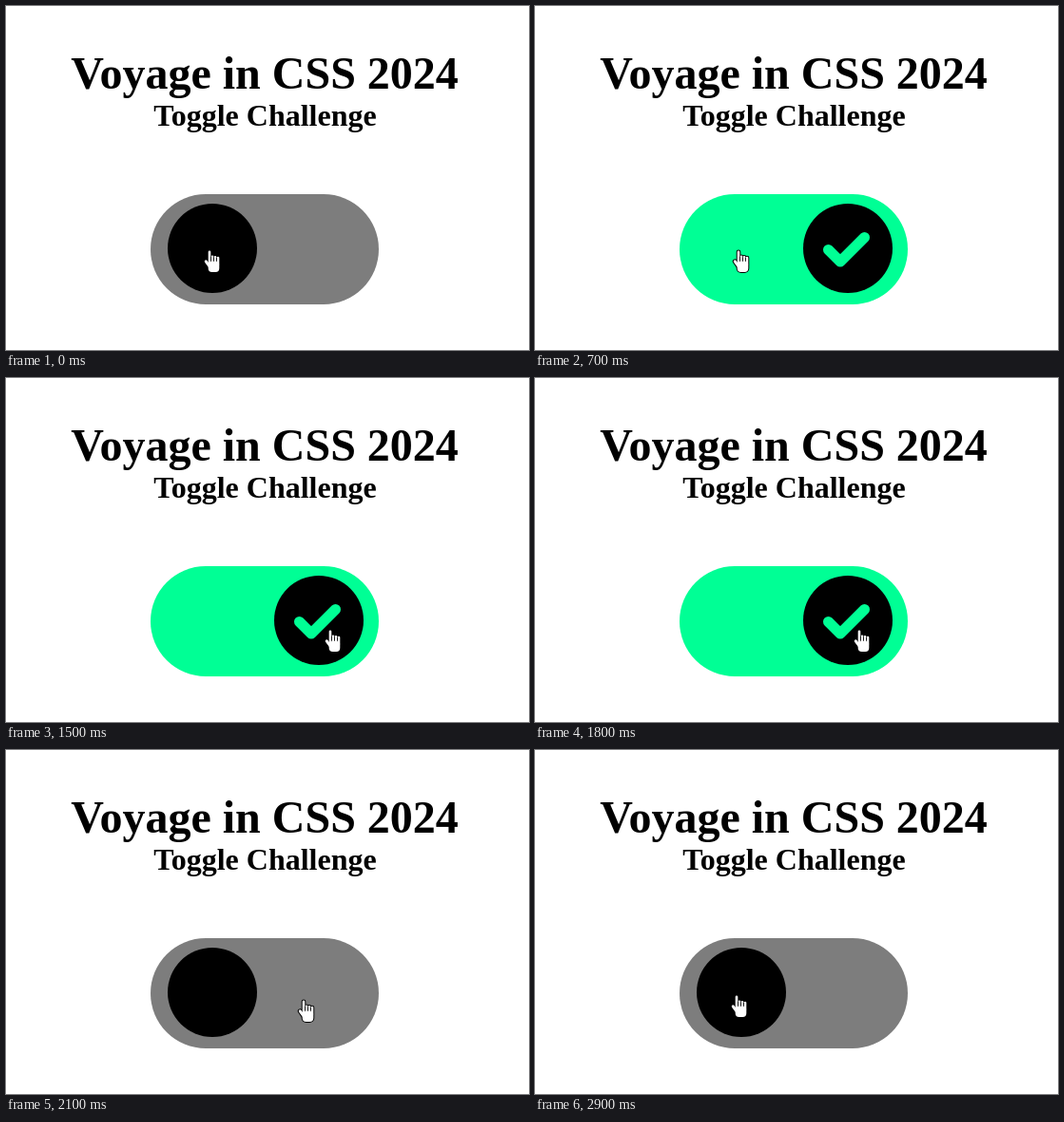
An HTML page with a canvas that plays this animation: 550 by 362 pixels, repeating every 3000 ms.

```html
<!DOCTYPE html>
<html lang="en">
<head>
<meta charset="utf-8">
<title>Toggle Challenge</title>
<style>
  html, body { margin: 0; width: 100%; height: 100%; overflow: hidden; background: #fff; }
  canvas { display: block; }
</style>
</head>
<body>
<canvas id="stage" width="550" height="362"></canvas>
<script>
const ctx = document.getElementById('stage').getContext('2d');
const LOOP = 3000, STEP = 100;
const SWITCH_ON = 464, SWITCH_OFF = 1833, SWITCH_TIME = 200;
const GREEN = 'rgb(0, 255, 149)', GREY = 125;
const START = { x: 208, y: 257 }, AWAY = { x: 335, y: 265 }, BACK = { x: 206, y: 258 };

const clamp = v => Math.min(1, Math.max(0, v));
const mix = (a, b, k) => a + (b - a) * k;
const progress = (t, from, duration) => clamp((t - from) / duration);
const smooth = k => k * k * (3 - 2 * k);
const bezier = (a, b, u) => 3 * a * u * (1 - u) ** 2 + 3 * b * u * u * (1 - u) + u ** 3;

// CSS "ease": cubic-bezier(.25, .1, .25, 1)
function ease(x) {
  let lo = 0, hi = 1;
  for (let i = 0; i < 24; i++) {
    const mid = (lo + hi) / 2;
    if (bezier(0.25, 0.25, mid) < x) lo = mid; else hi = mid;
  }
  return x === 0 || x === 1 ? x : bezier(0.1, 1, lo);
}

function text(str, size, x, y) {
  ctx.font = `bold ${size}px "Liberation Serif", "Times New Roman", serif`;
  ctx.textAlign = 'center';
  ctx.fillStyle = '#000';
  ctx.fillText(str, x, y);
}

function line(width, color, x1, y1, x2, y2) {
  ctx.lineWidth = width;
  ctx.strokeStyle = color;
  ctx.beginPath();
  ctx.moveTo(x1, y1);
  ctx.lineTo(x2, y2);
  ctx.stroke();
}

function pill(color, x, y, w, h, radius) {
  ctx.fillStyle = color;
  ctx.beginPath();
  ctx.roundRect(x, y, w, h, radius);
  ctx.fill();
}

function drawCheck(alpha) {
  const corner = { x: 321, y: 269 }, short = 12.5, long = 25.5;
  ctx.globalAlpha = alpha;
  ctx.lineWidth = 11;
  ctx.lineCap = ctx.lineJoin = 'round';
  ctx.strokeStyle = GREEN;
  ctx.beginPath();
  ctx.moveTo(corner.x - short, corner.y - short);
  ctx.lineTo(corner.x, corner.y);
  ctx.lineTo(corner.x + long, corner.y - long);
  ctx.stroke();
  ctx.globalAlpha = 1;
}

function drawToggle(t) {
  const on = ease(progress(t, SWITCH_ON, SWITCH_TIME));
  const off = ease(progress(t, SWITCH_OFF, SWITCH_TIME));
  const amount = on - off;
  const track = [0, 255, 149].map(c => Math.round(mix(GREY, c, amount)));

  pill(`rgb(${track})`, 152, 198, 240, 116, 58);
  pill('#000', mix(170, 282, amount), 208, 94, 94, 47);
  if (off === 0) drawCheck(on);
}

// One layer of the hand, grown by an outline margin
function drawHand(color, grow) {
  for (let i = 0; i < 4; i++) {
    const x = 6 + 3 * i, top = i ? 6 + 0.7 * i : 1.8;
    line(2.6 + 2 * grow, color, x, top, x, 15);
  }
  line(3 + 2 * grow, color, 2.3, 11.8, 6, 17);
  pill(color, 4.7 - grow, 12 - grow, 11.6 + 2 * grow, 11 + 2 * grow, 4 + grow);
}

function drawPointer(t) {
  const out = smooth(progress(t, 800, 600));
  const back = smooth(progress(t, 1950, 500));
  const at = axis => Math.round(mix(mix(START[axis], AWAY[axis], out), BACK[axis], back));

  ctx.save();
  ctx.translate(at('x'), at('y'));
  ctx.lineCap = 'round';
  drawHand('#000', 1);
  drawHand('#fff', 0);
  for (let i = 0; i < 3; i++) line(0.8, '#000', 7.5 + 3 * i, 7 + 0.7 * i, 7.5 + 3 * i, 11);
  ctx.restore();
}

function draw(now) {
  const t = Math.floor((now % LOOP) / STEP) * STEP;
  ctx.fillStyle = '#fff';
  ctx.fillRect(0, 0, 550, 362);
  text('Voyage in CSS 2024', 48, 272, 87);
  text('Toggle Challenge', 32, 272.5, 126);
  drawToggle(t);
  drawPointer(t);
}

let start;
function tick(now) {
  start ??= now;
  draw(Math.max(0, now - start));
  requestAnimationFrame(tick);
}
draw(0);
requestAnimationFrame(tick);
</script>
</body>
</html>
```
